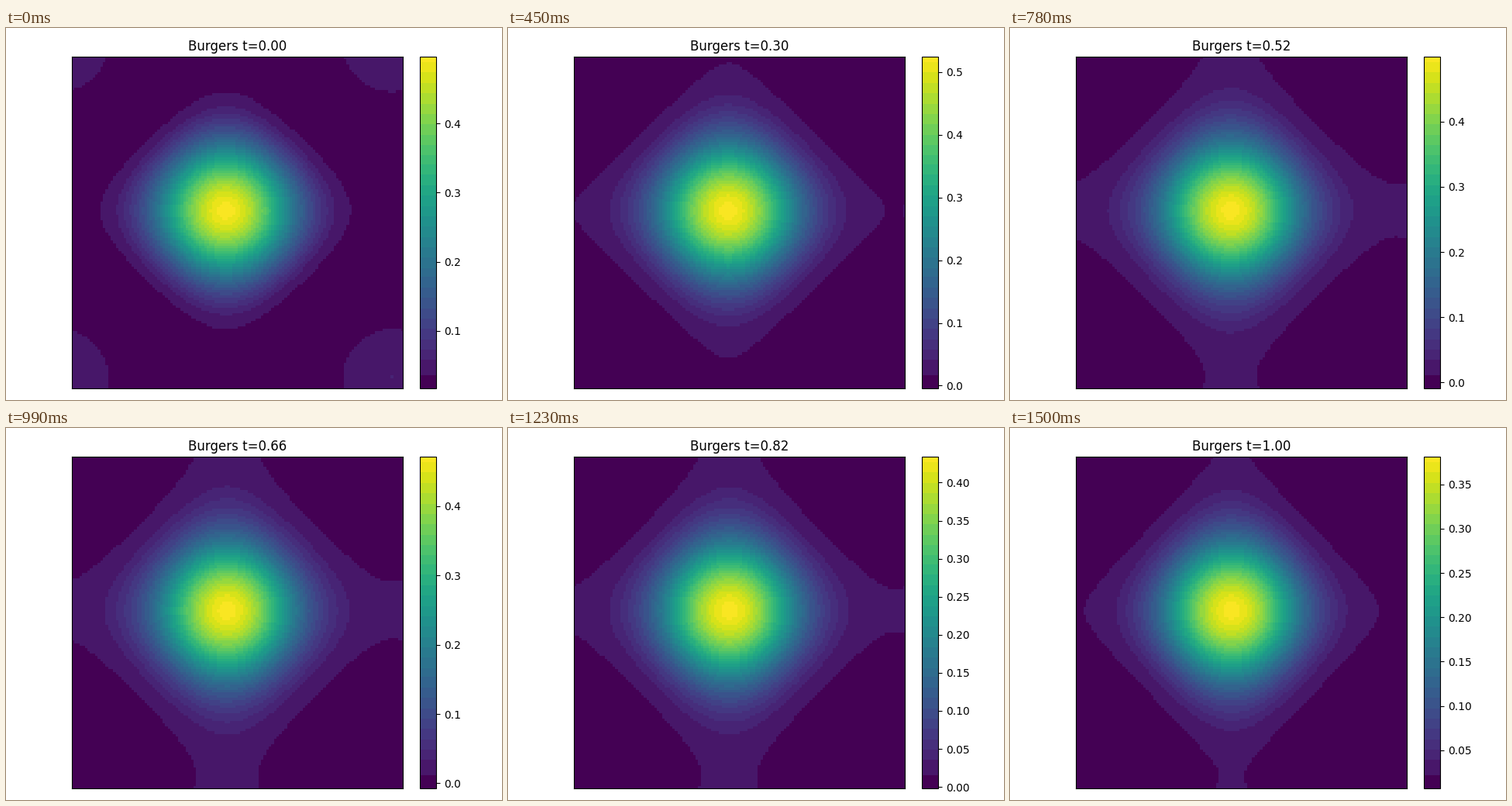
Animation of 640x480 px, one loop 1530 ms. Source, as a matplotlib script:

```python
import numpy as np
import matplotlib.pyplot as plt
from matplotlib.animation import FuncAnimation
from matplotlib.colors import ListedColormap

W, H, DPI = 640, 480, 100
FRAMES, INTERVAL = 51, 30
N = 128                                  # grid cells per side
LEFT, BOTTOM, SIZE = 84.6, 14.8, 427.8   # plot square in pixels
BAR_LEFT, BAR_WIDTH = 533.9, 21.4

# Colour range over time, as smooth curves through a few readings
times = [0, 0.16, 0.30, 0.52, 0.66, 0.82, 1]
low_curve = np.polyfit(
    times, [0.0163, 0.0042, -0.0048, -0.0095, -0.0078, -0.0020, 0.0067], 5)
high_curve = np.polyfit(
    times, [0.4966, 0.5195, 0.5246, 0.4988, 0.4717, 0.4334, 0.3810], 5)


def banded_viridis():
    """Viridis in flat steps, wider at the dark end."""
    edges = np.r_[0.04, np.linspace(0.087, 0.983, 30)]
    colors = plt.get_cmap("viridis")(np.arange(256))
    band = np.digitize((np.arange(256) + 0.5) / 256, edges)
    for b in range(1, len(edges) + 1):
        colors[band == b] = colors[band == b].mean(axis=0)
    colors[band == 0] = colors[0]
    return ListedColormap(colors)


def field(t):
    """Periodic peak, scaled to 0..1, with a fading bump opposite to it."""
    cells = (np.arange(N) + 0.5) / N
    x0 = (283 + 2.5 * t - LEFT) / SIZE
    y0 = (235.9 - (H - BOTTOM - SIZE)) / SIZE
    cx = np.cos(2 * np.pi * (cells - x0))[None, :]
    cy = np.cos(2 * np.pi * (cells - y0))[:, None]
    s = cx + cy + (0.05 * t - 0.027) * (cx - cy)
    e = np.exp(1.75 * (s - 2))
    broad = e * (1 + 0.35 * (1 - e) + 0.38 * (1 - e) ** 2)
    floor = 0.0005 + 0.12 * (t - 0.66) ** 2
    peak = (broad - floor) / (1 - floor)
    bump = max(0, 0.14 - 0.5 * t) * np.maximum(0, -s / 2) ** 2
    return np.clip(peak + bump, 0, 1)


def add_axes(left, width):
    return fig.add_axes([left / W, BOTTOM / H, width / W, SIZE / H])


fig = plt.figure(figsize=(W / DPI, H / DPI), dpi=DPI)
ax = add_axes(LEFT, SIZE)
im = ax.imshow(field(0), cmap=banded_viridis(), interpolation="nearest",
               aspect="auto")
ax.set_xticks([])
ax.set_yticks([])
title = ax.set_title("Burgers t=0.00")
fig.colorbar(im, cax=add_axes(BAR_LEFT, BAR_WIDTH))


def update(i):
    t = i / (FRAMES - 1)
    low, high = np.polyval(low_curve, t), np.polyval(high_curve, t)
    im.set_data(low + (high - low) * field(t))
    im.set_clim(low, high)
    title.set_text(f"Burgers t={t:.2f}")
    return im, title


anim = FuncAnimation(fig, update, frames=FRAMES, interval=INTERVAL,
                     repeat=True, repeat_delay=0)
plt.show()
```
